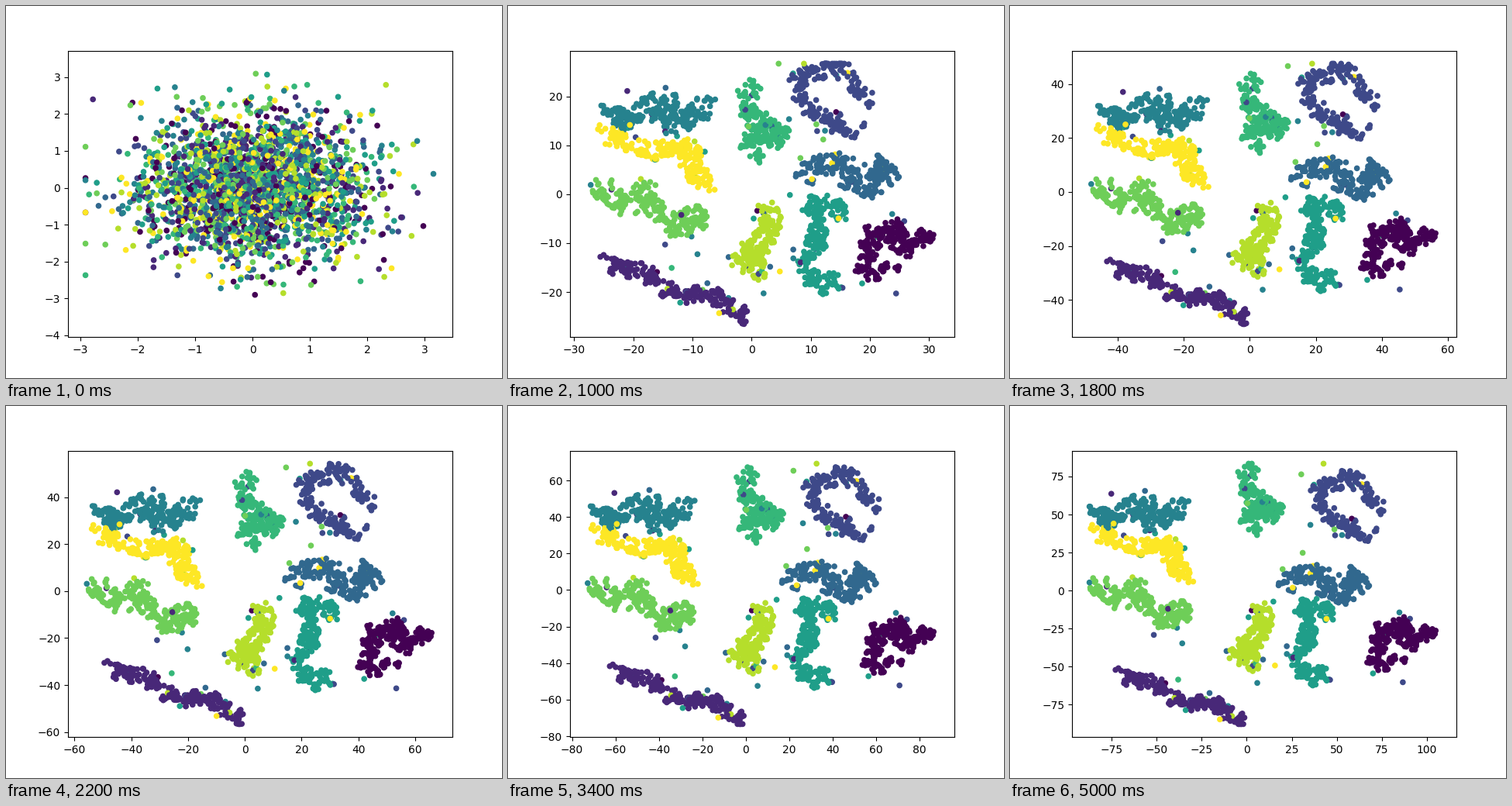
A matplotlib script that plays this animation: 640 px wide and 480 px high, repeating every 5200 ms.

```python
import numpy as np
import matplotlib.pyplot as plt
from matplotlib.animation import FuncAnimation

FRAMES, STEP, PER_CLASS = 26, 200, 250
rng = np.random.default_rng(4)

# Axes area in stage pixels, y pointing down, and its 5 % margins
ORIGIN, SIZE = np.array([80, 57.6]), np.array([496, 369.6])
LOW, HIGH = ORIGIN + SIZE / 22, ORIGIN + SIZE * 21 / 22

# Key axis limits: xmin, xmax, ymin, ymax; their squares grow steadily
KEYS = {
    0: (-3.216, 3.486, -4.05, 3.72),
    3: (-10.6, 12.0, -9.8, 9.6),
    5: (-30.72, 34.26, -29.2, 29.34),
    9: (-53.85, 62.6, -53.8, 52.4),
    17: (-80.9, 96.0, -80.5, 76.3),
    25: (-96.9, 116.3, -96.3, 92.0),
}


def limits(k):
    times = np.array(list(KEYS)) ** 0.7
    for side in np.array(list(KEYS.values())).T:
        sq = np.interp(k ** 0.7, times, side * abs(side))
        yield np.sign(sq) * abs(sq) ** 0.5


def disc(n):
    a, r = rng.uniform(0, 2 * np.pi, n), rng.uniform(0, 1, n) ** 0.5
    return np.column_stack((r * np.cos(a), r * np.sin(a)))


def cluster(drift, radius, *path):
    """Clumped points along a broad path, and their drift over the loop."""
    a, b = np.array(path[:-1], float), np.array(path[1:], float)
    length = np.linalg.norm(b - a, axis=1)
    m = PER_CLASS * 2 // 3
    seg = rng.choice(len(a), m, p=length / length.sum())
    nodes = a[seg] + rng.uniform(0, 1, (m, 1)) * (b - a)[seg]
    nodes += radius * disc(m)
    pts = nodes[rng.integers(0, m, PER_CLASS)] + 4 * disc(PER_CLASS)
    return pts, drift


clusters = [
    cluster((7, -7), 10, (505, 338), (463, 336), (475, 292), (505, 285),
            (512, 312), (546, 289)),
    cluster((5, 12), 11, (133, 340), (180, 354), (215, 375), (265, 378),
            (300, 403)),
    cluster((19, 11), 11, (458, 165), (415, 152), (392, 120), (385, 102),
            (435, 84), (468, 125)),
    cluster((-34, 12), 13, (365, 226), (385, 210), (410, 205), (420, 228),
            (450, 240), (450, 208), (475, 225)),
    cluster((-28, 0), 14, (116, 138), (145, 148), (185, 122), (195, 152),
            (240, 125)),
    cluster((-15, -3), 13, (425, 265), (385, 258), (395, 290), (380, 325),
            (385, 352), (412, 354)),
    cluster((-6, -30), 13, (311, 91), (305, 110), (320, 135), (350, 150),
            (310, 155), (315, 176)),
    cluster((-16, -7), 15, (116, 230), (150, 258), (165, 236), (205, 278),
            (240, 268)),
    cluster((-10, -6), 14, (328, 258), (330, 285), (318, 310), (298, 325),
            (320, 336)),
    cluster((-23, -5), 12, (119, 162), (155, 182), (225, 183), (222, 208),
            (245, 230)),
]
home = np.vstack([pts for pts, _ in clusters])
centre = np.repeat([pts.mean(axis=0) for pts, _ in clusters], PER_CLASS, axis=0)
drift = np.repeat([d for _, d in clusters], PER_CLASS, axis=0)
label = np.repeat(np.arange(10), PER_CLASS)
N = len(label)

# A few points stray into or around a wrong cluster
stray = rng.random(N) < 0.035
label[stray] = rng.integers(0, 10, stray.sum())
home[stray] += rng.normal(0, 14, (stray.sum(), 2))

order = rng.permutation(N)
home, centre, drift, label = (v[order] for v in (home, centre, drift, label))
start = [318, 234.5] + rng.normal(size=(N, 2)) * [74, 47.55]


def layout(k):
    """Stage positions: a cloud that condenses, then clusters that drift."""
    s = (max(k - 5, 0) / 20) ** 0.65
    spread = 1.07 - 0.13 * s
    if k < 5:
        spread *= 1 - 0.3 * np.sin(np.pi * k / 5)
    p = centre + (home - centre) * spread + drift * (s - 0.55)
    settled = 1 - max(1 - k / 5, 0) ** 3
    return np.clip(start + settled * (p - start), LOW, HIGH)


fig, ax = plt.subplots(figsize=(6.4, 4.8), dpi=100)
dots = ax.scatter(*start.T, s=20, c=label, cmap="viridis")


def draw(k):
    x0, x1, y0, y1 = limits(k)
    u = (layout(k) - ORIGIN) / SIZE
    dots.set_offsets([x0, y1] + u * [x1 - x0, y0 - y1])
    ax.set(xlim=(x0, x1), ylim=(y0, y1))
    return dots,


anim = FuncAnimation(fig, draw, frames=FRAMES, interval=STEP,
                     init_func=lambda: draw(0), repeat=True, repeat_delay=0)
plt.show()
```
